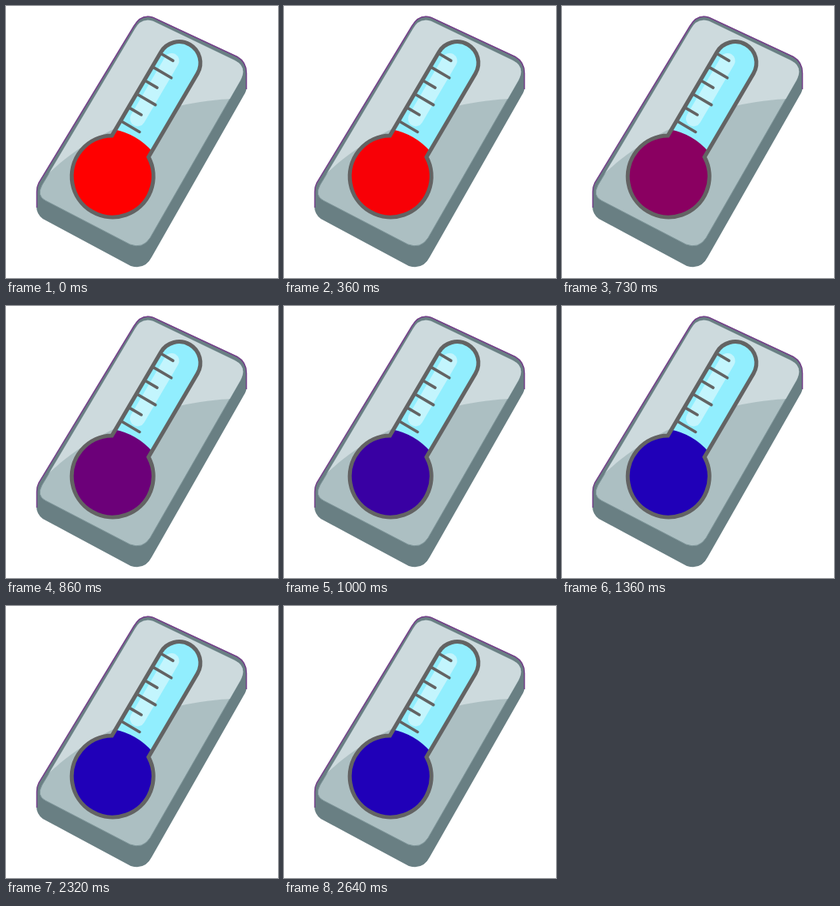
An HTML page for the animation above (2690 ms loop, 340x340 px).

```html
<!DOCTYPE html>
<html lang="en">
<head>
<meta charset="utf-8">
<title>Thermometer</title>
<style>
  html, body { margin: 0; height: 100%; overflow: hidden; background: #fff; }
  svg { display: block; width: 100vw; height: 100vh; }
</style>
</head>
<body>
<svg viewBox="0 0 340 340">
  <defs>
    <path id="face" d="M45 224 L161 29 Q169 14 184 19 L286 68 Q302 76 293 93 L180 290 Q171 304 155 298 L49 243 Q38 237 45 224Z"/>
    <path id="tube" d="M-26.5 -43.6 V-164.5 A26.5 26.5 0 0 1 26.5 -164.5 V-43.6 A51 51 0 1 1 -26.5 -43.6Z"/>
    <clipPath id="faceClip"><use href="#face"/></clipPath>
    <clipPath id="tubeClip"><use href="#tube"/></clipPath>
  </defs>

  <!-- slab -->
  <path fill="#697f83" d="M41 221 L160 25 Q169 9 184 14 L289 63 Q301 70 301 84 V100 Q301 106 297 112 L182 314 Q174 330 156 325 L46 266 Q38 260 38 250 V232 Q38 226 41 221Z"/>
  <path fill="none" stroke="#75408a" stroke-width="1.500" d="M38.5 252 V232 Q38.5 226 41 221 L160 25 Q169 9.500 184 14.500 L289 63.500 Q300.500 70 300.500 84 V104"/>
  <use href="#face" fill="#acbfc2" stroke="#7f969a" stroke-width="1"/>
  <path clip-path="url(#faceClip)" fill="#cddadd" d="M53 210 C100 163 190 118 288 116 L320 0 H0 V210Z"/>

  <!-- thermometer -->
  <g transform="translate(133.200 213) rotate(30.4)">
    <g clip-path="url(#tubeClip)">
      <path fill="#91eefe" d="M-30 -200 H30 V0 H-30Z"/>
      <path stroke="#c3f5fd" stroke-width="19" stroke-linecap="round" d="M-9.5 -162 V-78"/>
      <path id="liquid" fill="#f00" d="M-27 -52 Q0 -61 27 -52 L60 -30 V60 H-60 V-30Z"/>
    </g>
    <path fill="none" stroke="#636363" stroke-width="3.600" stroke-linecap="round"
      d="M-25 -65 H1 M-25 -84.600 H-8 M-25 -104.200 H1 M-25 -123.800 H-8 M-25 -143.400 H1 M-25 -163 H-8"/>
    <use href="#tube" fill="none" stroke="#636363" stroke-width="5"/>
  </g>
</svg>
<script>
  const LOOP = 2690, FPS = 22;
  const hot = [255, 0, 0], cold = [32, 0, 184];
  const liquid = document.getElementById('liquid');

  function draw(now) {
    const step = Math.floor((now % LOOP) * FPS / 1000 + 0.05);
    const time = step / FPS;
    const x = Math.min(1, Math.max(0, time - 0.21));
    const cooling = x * x * (3 - 2 * x);
    const rgb = hot.map((c, i) => Math.round(c + (cold[i] - c) * cooling));
    liquid.setAttribute('fill', `rgb(${rgb})`);
    requestAnimationFrame(draw);
  }
  requestAnimationFrame(draw);
</script>
</body>
</html>
```
